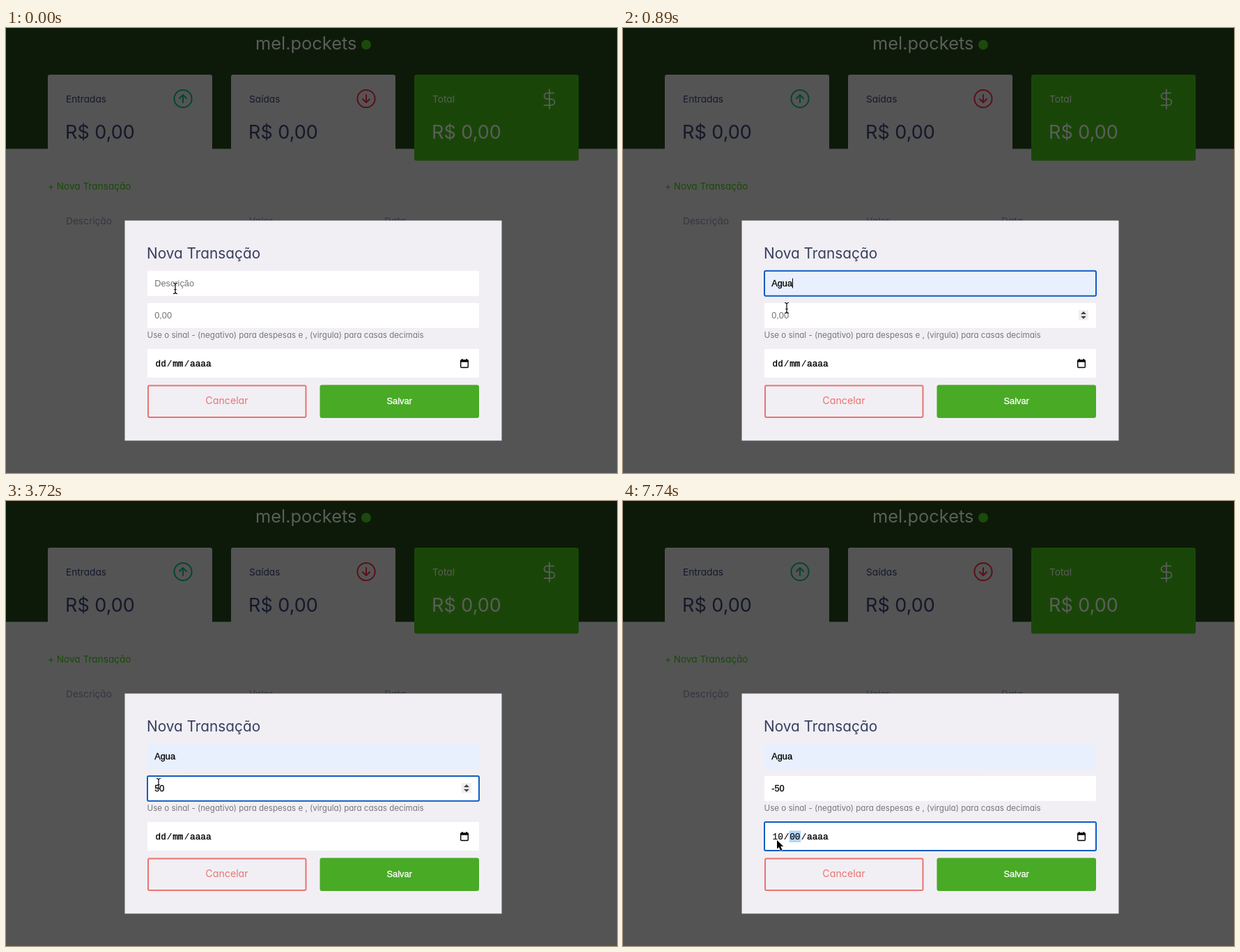
Write an HTML page that moves like this. It is 877 px wide and 639 px high and loops after 8000 ms.

```html
<!DOCTYPE html>
<html lang="pt-BR">
<head>
<meta charset="utf-8">
<title>Nova Transação</title>
<style>
  html, body { margin: 0; width: 100%; height: 100%; overflow: hidden; background: #545455; }
  svg { display: block; width: 100%; height: 100%; }
  text { white-space: pre; }
  .geo { font-family: Inter, "Open Sans", sans-serif; font-feature-settings: "cv11"; font-optical-sizing: none; }
  .menu { font: 500 12.8px Inter, sans-serif; fill: #111; }
  .input { font: 12.8px "Liberation Sans", Arial, sans-serif; }
  .date { font: 12.8px "Liberation Mono", "Courier New", monospace; fill: #000; stroke: #000; }
  .strong { stroke-width: .3; }
  .line { fill: none; stroke-width: 2; stroke-linecap: round; stroke-linejoin: round; }
</style>
</head>
<body>
<svg viewBox="0 0 877 639" preserveAspectRatio="none">
  <defs>
    <filter id="shadow" x="-10%" y="-10%" width="120%" height="125%">
      <feDropShadow dx="0" dy="1.5" stdDeviation="2" flood-color="#000" flood-opacity=".32"/>
    </filter>
  </defs>
  <g id="page"></g>
  <g id="form"></g>
</svg>
<script>
const LOOP = 8000;
const BLUE = '#0f5cc4', INK = '#15192a', PALE = '#5c5d5b', HINT = '#757575';

const rect = (x, y, w, h, fill, r = 0, extra = '') =>
  `<rect x="${x}" y="${y}" width="${w}" height="${h}" rx="${r}" fill="${fill}" ${extra}/>`;
const text = (x, y, str, cls, attrs = '') =>
  `<text x="${x}" y="${y}" class="${cls}" ${attrs}>${str}</text>`;
const geo = (x, y, str, size, fill, extra = '') =>
  text(x, y, str, 'geo', `font-size="${size}" fill="${fill}" ${extra}`);
const line = (d, color, extra = '') =>
  `<path class="line" d="${d}" stroke="${color}" ${extra}/>`;

function card(x, label, fill, ink) {
  return rect(x, 67, 236, 123.5, fill, 3) +
    geo(x + 26, 107, label, 13.7, ink) +
    geo(x + 25, 159, 'R$ 0,00', 27, ink);
}

function arrowIcon(x, color, dir) {
  const tip = 101.5 - 5.5 * dir;
  return `<circle class="line" cx="${x}" cy="101.5" r="12.6" stroke="${color}"/>` +
    line(`M${x} ${101.5 + 5.5 * dir}V${tip}M${x - 5} ${tip + 5 * dir}L${x} ${tip}L${x + 5} ${tip + 5 * dir}`, color);
}

function page() {
  const dollar = 'M12 1V23M17 5H9.5a3.5 3.5 0 0 0 0 7h5a3.5 3.5 0 0 1 0 7H6';
  return rect(0, 0, 877, 639, '#545455') +
    rect(0, 0, 877, 173.5, '#0d1a09') +
    geo(358, 31, 'mel.pockets', 25.4, PALE) +
    '<circle cx="517" cy="24" r="7" fill="#1b4a0b"/>' +
    card(60, 'Entradas', '#545455', INK) +
    card(323, 'Saídas', '#545455', INK) +
    card(586, 'Total', '#194608', PALE) +
    arrowIcon(254, '#06452a', 1) +
    arrowIcon(517, '#5a1018', -1) +
    line(dollar, PALE, 'transform="translate(765 87) scale(1.25)" style="stroke-width:1.4"') +
    geo(60, 231.5, '+ Nova Transação', 13.6, '#194a05') +
    geo(86, 282, 'Descrição', 13.7, '#34373f') +
    geo(349, 282, 'Valor', 13.7, '#34373f') +
    geo(543, 282, 'Data', 13.7, '#34373f') +
    rect(170.5, 276.5, 541, 316, '#f1eff4') +
    geo(202, 330.5, 'Nova Transação', 20.8, '#363f5f') +
    geo(202.5, 445, 'Use o sinal - (negativo) para despesas e , (virgula) para casas decimais', 11.6, '#77767b') +
    rect(204, 513.5, 226.5, 45.5, 'none', 2, 'stroke="#ea7371" stroke-width="2"') +
    geo(317, 540, 'Cancelar', 14.2, '#ea7371', 'text-anchor="middle"') +
    rect(450.5, 512.5, 228.5, 47.5, '#49aa26', 3) +
    text(564.7, 540, 'Salvar', 'input strong', 'fill="#fff" stroke="#fff" text-anchor="middle"');
}

// Each entry changes part of the form state and holds until the next one.
const steps = [
  [0, { cursor: 'beam', x: 243, y: 374, focus: '', menu: false, hot: false, desc: '', value: '',
        caret: null, spin: false, day: 'dd', month: 'mm', part: '' }],
  [150, { focus: 'desc', menu: true, x: 242, y: 375 }],
  [440, { cursor: 'arrow', x: 237, y: 386 }],
  [590, { x: 234, y: 393, hot: true }],
  [740, { y: 395 }],
  [890, { cursor: 'beam', x: 235, y: 402, menu: false, desc: 'Agua', caret: 243.2, spin: true }],
  [1030, { x: 230, y: 403 }],
  [1180, { x: 224, y: 405 }],
  [1330, { x: 219, y: 406 }],
  [1480, { focus: 'value', caret: 213.2 }],
  [1920, { caret: null }],
  [2370, { caret: 213.2 }],
  [2970, { value: '5', caret: 220.3 }],
  [3120, { value: '50', caret: 227.4 }],
  [3720, { caret: null }],
  [4170, { caret: 227.4 }],
  [4470, { caret: 220.3 }],
  [4620, { caret: 213.2 }],
  [4910, { value: '-50', caret: 217.4 }],
  [5360, { caret: null, y: 410 }],
  [5500, { x: 220, y: 428 }],
  [5650, { cursor: 'arrow', x: 222, y: 468, spin: false }],
  [5800, { y: 494 }],
  [5940, { x: 221, y: 488, focus: 'date', part: 'day' }],
  [6090, { y: 487 }],
  [7290, { day: '10', part: 'month' }],
  [7740, { month: '00' }]
];
const states = [];
steps.reduce((prev, [at, patch]) => {
  const next = { ...prev, ...patch, at };
  states.push(next);
  return next;
}, {});

function field(y, h, focused, fill = '#fff') {
  const ring = focused ? `stroke="${BLUE}" stroke-width="2"` : '';
  return rect(203, y, 476, h, fill, focused ? 2 : 1, ring);
}

const typed = (y, str, hint) => str
  ? text(213.2, y, str, 'input strong', 'fill="#000" stroke="#000"')
  : text(213.2, y, hint, 'input', `fill="${HINT}"`);

function dateField(s) {
  const parts = [[214.5, s.day], [230.8, '/'], [239.2, s.month], [255.8, '/'], [264, 'aaaa']];
  const mark = s.part === 'day' ? 213.5 : 238.5;
  return field(461, 41, s.focus === 'date') +
    (s.part ? rect(mark, 473.5, 16.7, 16.5, '#b3d5fb') : '') +
    parts.map(([x, str]) =>
      text(x, 486, str, 'date', `stroke-width="${/[a-z]/.test(str) ? .35 : .12}"`)).join('') +
    rect(652.7, 477.2, 10.6, 10.3, 'none', 1, 'stroke="#000" stroke-width="1.4"') +
    rect(652, 476.5, 12, 3.2, '#000', 1) +
    rect(654, 475, 1.5, 3, '#000') + rect(660.5, 475, 1.5, 3, '#000');
}

const spinner = () => rect(654, 405, 14, 14.5, '#efefef') +
  '<path d="M657 411L661 407L665 411ZM657 413.8L661 417.8L665 413.8Z" fill="#444"/>';

function menu(hot) {
  const items = ['Agua', 'Salario', 'IPTU', 'App'];
  return '<path d="M203 387H386V534a4 4 0 0 1 -4 4H207a4 4 0 0 1 -4 -4Z" fill="#fff" filter="url(#shadow)"/>' +
    (hot ? rect(203, 393, 183, 34.5, '#e7e7e7') : '') +
    items.map((str, i) => text(214, 415.3 + i * 34.3, str, 'menu')).join('');
}

function cursor({ cursor, x, y }) {
  const shape = cursor === 'beam'
    ? '<path d="M-3 -7.5Q0 -7.5 0 -5.5Q0 -7.5 3 -7.5M0 -5.5V5.5M-3 7.5Q0 7.5 0 5.5Q0 7.5 3 7.5M-1.7 1.5H1.7" fill="none" stroke="#fff" stroke-width="2.4" opacity=".7"/>' +
      '<path d="M-3 -7.5Q0 -7.5 0 -5.5Q0 -7.5 3 -7.5M0 -5.5V5.5M-3 7.5Q0 7.5 0 5.5Q0 7.5 3 7.5M-1.7 1.5H1.7" fill="none" stroke="#000" stroke-width="1.2"/>'
    : '<path d="M0 0V12.6L2.9 9.9L5.1 15L7.5 14L5.3 9H9.2Z" fill="#000" stroke="#fff" stroke-width="1.1" paint-order="stroke"/>';
  return `<g transform="translate(${x} ${y})">${shape}</g>`;
}

function form(s) {
  const caretY = s.focus === 'desc' ? 359.5 : 406;
  return field(348.7, 36, s.focus === 'desc', s.desc ? '#e8f0fe' : '#fff') +
    typed(370.7, s.desc, 'Descrição') +
    field(395, 35.7, s.focus === 'value') +
    typed(417.2, s.value, '0,00') +
    (s.spin ? spinner() : '') +
    (s.caret === null ? '' : rect(Math.round(s.caret), caretY, 1, 14, '#000')) +
    dateField(s) +
    (s.menu ? menu(s.hot) : '') +
    cursor(s);
}

const formNode = document.getElementById('form');
document.getElementById('page').innerHTML = page();
const start = performance.now();
let shown = null;

function frame() {
  const t = Math.max(0, performance.now() - start) % LOOP;
  const state = states.findLast(s => s.at <= t);
  if (state !== shown) {
    formNode.innerHTML = form(state);
    shown = state;
  }
  requestAnimationFrame(frame);
}
frame();
</script>
</body>
</html>
```
